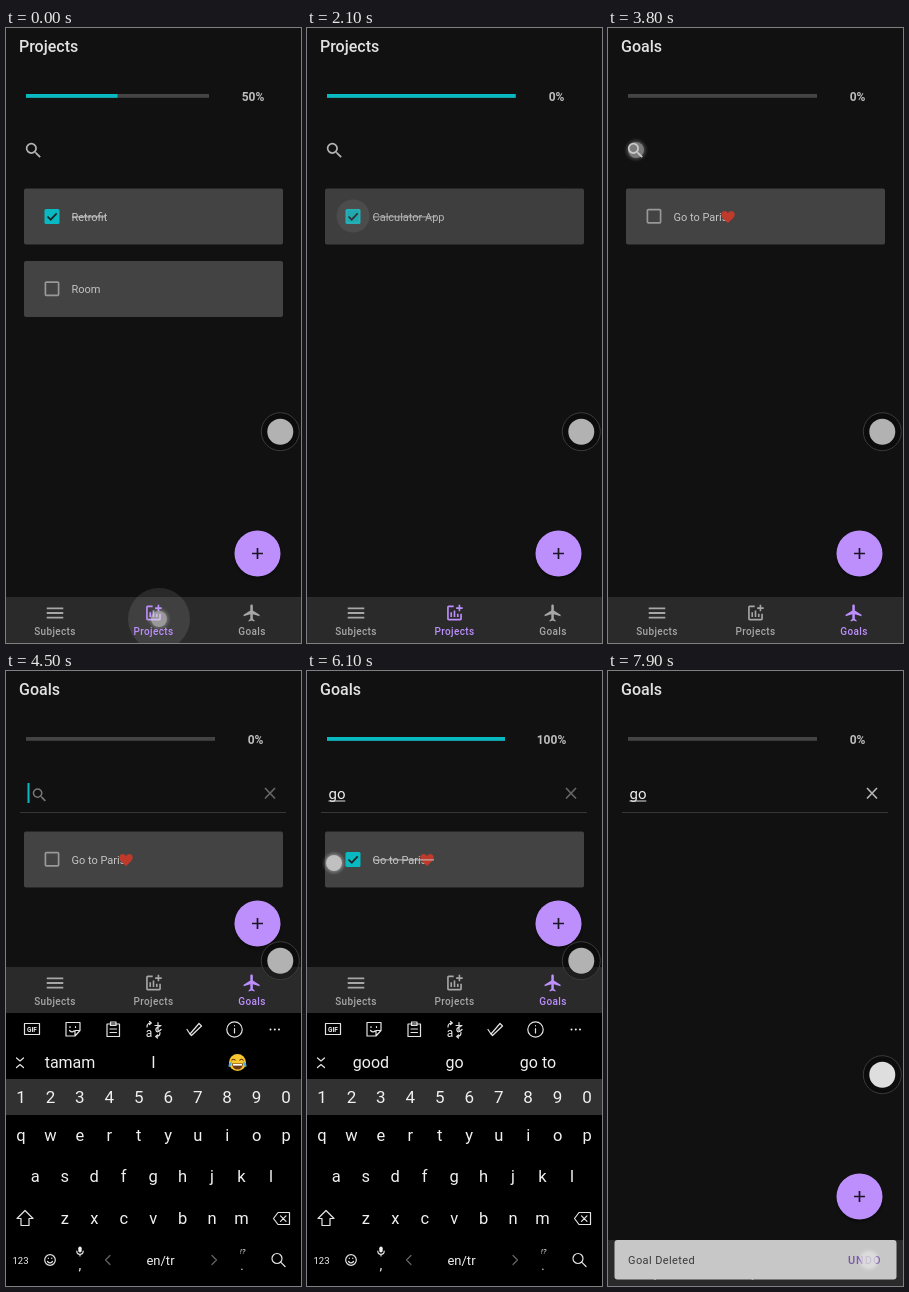
Write an HTML page that moves like this. It is 295 px wide and 615 px high and loops after 8000 ms.

```html
<!DOCTYPE html>
<html lang="en">
<head>
<meta charset="utf-8">
<title>Goals app</title>
<style>
html, body { margin: 0; width: 100%; height: 100%; overflow: hidden; background: #111; }
svg { display: block; width: 295px; height: 615px; font-family: Roboto, "Noto Sans", sans-serif; }
.mid { text-anchor: middle; }
.card text { font-size: 11px; font-stretch: condensed; font-stretch: 75%; fill: #c4c4c4; }
.tab text { font-size: 10px; letter-spacing: .35px; font-weight: 500; text-anchor: middle; }
.line { fill: none; stroke: #e4e4e4; stroke-width: 1.2; stroke-linecap: round; stroke-linejoin: round; }
</style>
</head>
<body>
<svg id="stage" viewBox="0 0 295 615"></svg>
<script>
const LOOP = 8000, BAR_MS = 690, FADE_MS = 250, KEYS_H = 273;
const TEAL = '#08b9c2', PURPLE = '#bd8ffd', GREY = '#a6a6a6';

const ICON = {
  search: 'M15.5 14h-.79l-.28-.27A6.47 6.47 0 0 0 16 9.5 6.5 6.5 0 1 0 9.5 16c1.61 0 3.09-.59 4.23-1.57l.27.28v.79l5 4.99L20.49 19l-4.99-5zm-6 0C7.01 14 5 11.99 5 9.5S7.01 5 9.5 5 14 7.01 14 9.5 11.99 14 9.5 14z',
  menu: 'M3 18h18v-2H3zM3 13h18v-2H3zM3 8h18V6H3z',
  chart: 'M22 5v2h-3v3h-2V7h-3V5h3V2h2v3zM19 19H5V5h6V3H5c-1.1 0-2 .9-2 2v14c0 1.1.9 2 2 2h14c1.1 0 2-.9 2-2v-6h-2zM15 13v4h2v-4zM11 17h2V9h-2zM9 17v-6H7v6z',
  plane: 'M21 16v-2l-8-5V3.5c0-.83-.67-1.5-1.5-1.5S10 2.67 10 3.5V9l-8 5v2l8-2.5V19l-2 1.5V22l3.5-1 3.5 1v-1.5L13 19v-5.5z'
};

// List states: start time, percent, items as [label, done, width, heart]
const states = [
  { at: -1000, pct: 50, items: [['Retrofit', 1, 33], ['Room', 0, 25]] },
  { at: 10, pct: 0, items: [['Calculator App', 0, 63]] },
  { at: 980, pct: 100, items: [['Calculator App', 1, 63]] },
  { at: 2080, pct: 0, items: [['Calculator App', 0, 63]] },
  { at: 2690, pct: 0, items: [['Go to Paris', 0, 61, 1]] },
  { at: 5410, pct: 100, items: [['Go to Paris', 1, 61, 1]] },
  { at: 6300, pct: 0, items: [] }
];
const trackW = { 0: 189, 50: 183, 100: 178 };

// Finger dots: start, end, x, y, x at end
const touches = [
  [-200, 180, 153, 591], [880, 1010, 46, 188], [1960, 2100, 46, 188],
  [2640, 2860, 246, 582], [3700, 3840, 28, 122], [4700, 4820, 147, 505],
  [5050, 5170, 251, 464], [5300, 5440, 46, 188], [6000, 6300, 27, 192, 230],
  [7780, 8100, 261, 589]
];
const checkTaps = [930, 2010, 5340];

const words = [
  { at: 0, list: ['tamam', 'I', ''] },
  { at: 4750, list: ['good', 'g', 'go'] },
  { at: 5100, list: ['good', 'go', 'go to'] }
];

const icon = (name, x, y, s, fill = 'currentColor') =>
  `<path d="${ICON[name]}" fill="${fill}" transform="translate(${x} ${y}) scale(${s}) translate(-12 -12)"/>`;
const text = (s, x, y, size, extra = '') =>
  `<text x="${x}" y="${y}" font-size="${size}" ${extra}>${s}</text>`;
const line = (d, extra = '') => `<path class="line" d="${d}" ${extra}/>`;
const row = (chars, x, y, size) =>
  [...chars].map((c, i) => text(c, x + i * 29.45, y, size, 'class="mid"')).join('');

function card([label, done, w, heart], i) {
  const box = done
    ? `<rect x="38.5" y="181" width="15" height="15" rx="1.5" fill="${TEAL}"/><path d="M41.5 188.5l3.2 3.2 6-6.4" fill="none" stroke="#222" stroke-width="1.7"/>`
    : '<rect x="39.4" y="181.6" width="13.2" height="13.2" rx="1" fill="none" stroke="#989898" stroke-width="1.7"/>';
  const love = heart
    ? '<path d="M120 195C115 190.500 113.300 188.800 113.300 186.500C113.300 182.700 118.200 181.800 120 185.200C121.800 181.800 126.700 182.700 126.700 186.500C126.700 188.800 125 190.500 120 195Z" fill="#c03a2b"/>' : '';
  const strike = done ? `<path d="M66 188.900h${w}" stroke="#c4c4c4" stroke-width="1"/>` : '';
  return `<g class="card" transform="translate(0 ${i * 72.5})">
    <rect x="18" y="160.500" width="259" height="56" rx="2" fill="#434343"/>
    ${box}${text(label, 65.500, 192.700, 11)}${love}${strike}</g>`;
}

const tab = (id, label, ic, x, s) =>
  `<g class="tab" id="${id}">${icon(ic, x, 585, s)}${text(label, x, 607, 10, 'fill="currentColor"')}</g>`;

function keyboard() {
  const tools = line('M18.500 352.500h15v11h-15z') + text('GIF', 26, 361, 6.500, 'class="mid" font-weight="700"') +
    line('M60 351.500h14v8l-5 5.500h-9zM74 359.500h-5v5.500M64 355.500v1M69.500 355.500v1M63.500 359.500q2.500 2.500 4.500 .5') +
    line('M101 353h12.500v12.500h-12.500zM104.500 351h5.500v3.500h-5.500zM104 358h6.500M104 361.500h6.500') +
    text('a', 143, 366, 12, 'class="mid"') +
    line('M149 354.500h6M152 351.500v8M154 355.500q-5 1-4 4t5-1M141 356q0-4 4-4m-1.500-1.500l1.800 1.500-1.800 1.500M154 361.500q0 4-4 4m1.500-1.500l-1.800 1.500 1.800 1.500') +
    line('M181 358.500l3 4.500 9-10.500 2.500 2.500-10 9.500-2-2') +
    '<circle class="line" cx="228.500" cy="358.500" r="7.700"/>' + line('M228.500 357.500v4.500M228.500 354.700v.1') +
    [264.500, 268.800, 273].map(x => `<circle cx="${x}" cy="358.500" r="1"/>`).join('');
  const bottom = text('123', 14.500, 593, 9.500, 'class="mid"') +
    '<circle class="line" cx="44" cy="589" r="5.300"/>' + line('M42.300 587.200v.3M45.800 587.200v.3M41.500 590.500q2.500 2.800 5 0') +
    '<rect x="72.300" y="575.500" width="3.400" height="6" rx="1.700"/>' + line('M70.800 580q0 3.300 3.200 3.300t3.200-3.300M74 583.500v1.500', 'stroke-width=".8"') +
    text(',', 74, 599, 14, 'class="mid"') + text('.', 236, 599, 13, 'class="mid"') +
    line('M104 584.500l-4.500 4.500 4.500 4.500M206 584.500l4.500 4.500-4.500 4.500', 'style="stroke:#666"') +
    text('en/tr', 154.500, 593.500, 13, 'class="mid"') + text('!?', 236.500, 583, 8, 'class="mid" font-style="italic"') +
    '<circle class="line" cx="271" cy="587.500" r="5"/>' + line('M274.700 591.200l4.300 4.300');
  const laugh = `<g id="laugh"><circle cx="231.500" cy="391.500" r="8.500" fill="#f8c62f"/>
    <path d="M226 392.500h11q-.5 6-5.500 6t-5.500-6z" fill="#6a3a16"/><path d="M227 393h9v1.600h-9z" fill="#fff"/>
    <path d="M225.500 389.500q2-2.500 4 0M233.500 389.500q2-2.500 4 0" fill="none" stroke="#6a3a16" stroke-width="1.200"/>
    <path d="M226 390.500q-4 2-3.500 5 2 2 3.500-5M237 390.500q4 2 3.500 5-2 2-3.500-5" fill="#4aa8e8"/></g>`;
  return `<rect y="342" width="295" height="273" fill="#000"/>
    <rect y="408" width="295" height="36" fill="#313131"/>
    <rect id="press" width="26" height="28" rx="4" fill="#444"/>
    <g fill="#f0f0f0">${tools}
    ${line('M10.500 387l3.500 3 3.500-3M10.500 396.500l3.500-3 3.500 3')}
    ${[64, 147.500, 231].map((x, i) => text('', x, 397, 16, `class="mid" id="word${i}"`)).join('')}${laugh}
    ${row('1234567890', 15, 432, 17)}${row('qwertyuiop', 15, 469.500, 16.500)}
    ${row('asdfghjkl', 29.300, 511, 16.500)}${row('zxcvbnm', 58.800, 552.500, 16.500)}
    ${line('M19 539.500l8 8h-4v7h-8v-7h-4z')}
    ${line('M272 541.500h11.500v12h-11.500l-4.500-6zM274.500 544.800l5.500 5.500M280 544.800l-5.500 5.500')}
    ${bottom}</g>`;
}

stage.innerHTML = `
<defs>
  <clipPath id="navClip"><rect y="569" width="295" height="46"/></clipPath>
  <filter id="soft" x="-50%" y="-50%" width="200%" height="200%"><feGaussianBlur stdDeviation="1.500"/></filter>
</defs>
<rect width="295" height="615" fill="#111"/>
<text id="head" x="13" y="24" font-size="16" font-weight="500" fill="#e2e2e2"></text>
<rect id="track" x="20" y="66" width="189" height="3.800" fill="#444"/>
<rect id="fill" x="20" y="66" height="3.800" fill="${TEAL}"/>
<text id="pct" y="72.700" font-size="12" font-weight="700" fill="#bdbdbd" class="mid"></text>
<g id="glass">${icon('search', 0, 0, .86)}</g>
<g id="field">
  <path d="M14 141.500h266" stroke="#373737"/>
  <path id="clear" d="M259 117l10 10.500M269 117l-10 10.500" stroke-width="1.700"/>
  <text id="query" x="21.500" y="128" font-size="15" fill="#eee"></text>
  <path id="under" stroke="#ddd" stroke-width="1"/>
  <rect id="caret" y="112" width="2" height="20" fill="${TEAL}"/>
</g>
${states.map((s, i) => `<g id="list${i}">${s.items.map(card).join('')}</g>`).join('')}
<circle id="checkRipple" cx="46" cy="188" r="16.500" fill="#fff"/>
<g id="dock">
  <rect y="569" width="295" height="46" fill="#2a2a2a"/>
  <circle id="ripA" cx="153" cy="591" r="31" fill="#fff"/>
  <g clip-path="url(#navClip)"><circle id="ripB" cx="246" cy="591" fill="#fff"/></g>
  ${tab('tab0', 'Subjects', 'menu', 49, .92)}${tab('tab1', 'Projects', 'chart', 147.500, .82)}${tab('tab2', 'Goals', 'plane', 246, .84)}
  <circle cx="251.500" cy="528" r="22.500" fill="#000" opacity=".45" filter="url(#soft)"/>
  <g id="fab"><circle cx="251.500" cy="525.500" r="23" fill="${PURPLE}"/>
  <path d="M246 525.500h11M251.500 520v11" stroke="#1b1524" stroke-width="1.700"/></g>
</g>
<g id="snack">
  <rect x="6.500" y="569" width="282" height="39.500" rx="3" fill="#c8c7c8"/>
  ${text('Goal Deleted', 20, 593, 11, 'fill="#3a3a3a" letter-spacing=".4"')}
  ${text('UNDO', 240, 593, 11, 'fill="#7554a6" font-weight="500" letter-spacing=".9"')}
</g>
<g id="keys">${keyboard()}</g>
<g id="ball">
  <circle r="19" fill="#000" fill-opacity=".3" stroke="#3a3a3a"/>
  <circle id="core" r="13"/>
</g>
${touches.map((_, i) => `<g id="dot${i}"><circle r="10" fill="#fff" opacity=".3" filter="url(#soft)"/><circle r="8" fill="#ddd" opacity=".7"/></g>`).join('')}`;

const $ = id => document.getElementById(id);
const set = (id, attrs) => { for (const k in attrs) $(id).setAttribute(k, attrs[k]); };
const prog = (t, a, b) => Math.min(1, Math.max(0, (t - a) / (b - a)));
const smooth = p => (1 - Math.cos(Math.PI * p)) / 2;
const shift = (x, y) => `translate(${x} ${y})`;
const lastAt = (list, t) => list.findLastIndex(s => t >= s.at);

function drawLists(t) {
  const n = lastAt(states, t), cur = states[n], prev = states[n - 1] || cur;
  const mix = cur.items.length ? prog(t, cur.at, cur.at + FADE_MS) : 1;
  states.forEach((_, i) => set('list' + i, { opacity: i === n ? mix : i === n - 1 ? 1 - mix : 0 }));
  const swipe = prog(t, 6110, 6290);
  set('list5', { transform: shift(290 * swipe * swipe, 0) });

  const share = prev.pct + (cur.pct - prev.pct) * smooth(prog(t, cur.at, cur.at + BAR_MS));
  const w = trackW[cur.pct];
  set('track', { width: w });
  set('fill', { width: w * share / 100 });
  $('pct').textContent = cur.pct + '%';
  set('pct', { x: cur.pct === 0 ? 249.5 : cur.pct === 50 ? 247 : 244.5 });

  const tap = checkTaps.findLast(a => t >= a);
  set('checkRipple', { opacity: tap ? .075 * prog(t, tap, tap + 60) * (1 - prog(t, tap + 250, tap + 650)) : 0 });
}

function drawSearch(t) {
  const open = prog(t, 3800, 3950), typed = t < 4750 ? '' : t < 5100 ? 'g' : 'go';
  set('glass', {
    transform: shift(27.5 + 6 * open, 122.5 + 1.5 * open) + ` scale(${1 - .12 * open})`,
    color: open > .5 ? '#777' : '#b4b4b4', opacity: typed ? 0 : 1
  });
  set('field', { opacity: open });
  set('clear', { stroke: t < 6900 ? '#666' : '#b4b4b4' });
  $('query').textContent = typed;
  const end = 21.5 + [0, 8.4, 16.8][typed.length];
  set('under', { d: typed ? `M21.500 130H${end}` : '' });
  const lit = t < 4400 || (t < 5950 && (t - 4400) % 1000 < 500);
  set('caret', { x: end, opacity: lit ? 1 : 0 });
}

function drawDock(t) {
  const goals = t >= 2690;
  $('head').textContent = goals ? 'Goals' : 'Projects';
  ['tab0', 'tab1', 'tab2'].forEach((id, i) => set(id, { color: i === (goals ? 2 : 1) ? PURPLE : GREY }));
  set('dock', { transform: shift(0, t >= 4400 && t < 6300 ? -KEYS_H : 0) });
  set('ripA', { opacity: .1 * (1 - prog(t, 50, 550)) });
  set('ripB', {
    r: 8 + 90 * prog(t, 2680, 2920),
    opacity: t < 2680 ? 0 : .2 * (1 - prog(t, 2900, 3400))
  });
  set('fab', { opacity: 1 - .25 * Math.sin(Math.PI * prog(t, 2690, 2940)) });
  set('snack', { opacity: prog(t, 6400, 6600) });
}

function drawKeys(t) {
  const up = smooth(prog(t, 4030, 4380)) - smooth(prog(t, 6850, 7350));
  set('keys', { transform: shift(0, KEYS_H * (1 - up)) });
  const n = lastAt(words, t);
  words[n].list.forEach((w, i) => { $('word' + i).textContent = w; });
  set('laugh', { opacity: n ? 0 : 1 });
  const g = t >= 4720 && t < 4850, o = t >= 5070 && t < 5200;
  set('press', { x: g ? 134 : 238, y: g ? 491 : 450, opacity: g || o ? 1 : 0 });
  const lift = smooth(prog(t, 4280, 4450)) - smooth(prog(t, 7300, 7480));
  set('ball', { transform: shift(274.3, 403.7 - 114 * lift) });
  set('core', { fill: t >= 7300 ? '#dedede' : '#b2b2b2' });
}

function drawTouches(t) {
  touches.forEach(([a, b, x, y, x2 = x], i) => {
    const move = prog(t, 6110, 6290);
    set('dot' + i, {
      transform: shift(x + (x2 - x) * move * move, y),
      opacity: prog(t, a, a + 60) * (1 - prog(t, b - 60, b)) * (t < 200 ? .7 : 1)
    });
  });
}

function render(t) {
  drawLists(t);
  drawSearch(t);
  drawDock(t);
  drawKeys(t);
  drawTouches(t);
}

const start = performance.now();
function tick() {
  render((performance.now() - start) % LOOP);
  requestAnimationFrame(tick);
}
render(0);
requestAnimationFrame(tick);
</script>
</body>
</html>
```
